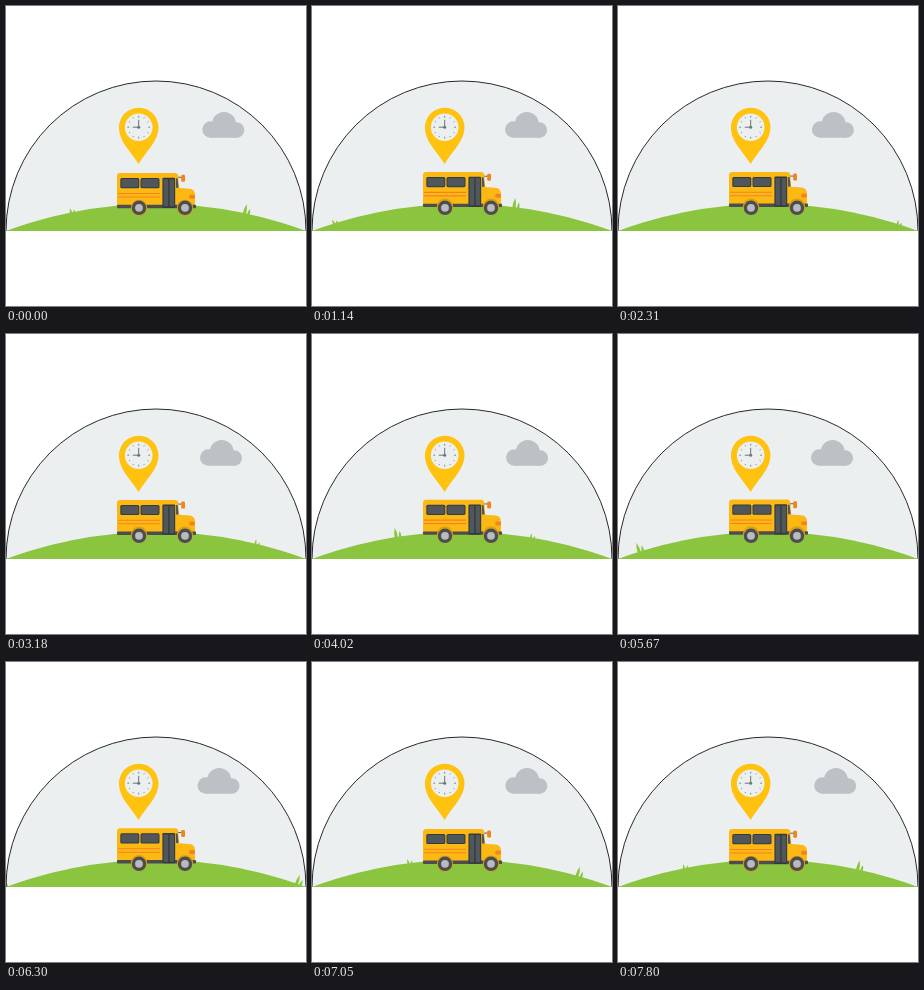
An HTML page with a canvas for the animation above (7.83 s loop, 300x300 px).

```html
<!DOCTYPE html>
<html lang="en">
<head>
<meta charset="utf-8">
<title>School bus</title>
<style>
html, body { margin: 0; width: 100%; height: 100%; overflow: hidden; background: #fff; }
canvas { display: block; width: 300px; height: 300px; }
</style>
</head>
<body>
<canvas id="stage" width="300" height="300"></canvas>
<script>
const canvas = document.getElementById('stage');
const ctx = canvas.getContext('2d');
const ratio = window.devicePixelRatio || 1;
canvas.width = canvas.height = 300 * ratio;

const LOOP = 7830, STEP = 30, TAU = Math.PI * 2;
const HILL = { x: 150, y: 628, r: 430 };
const C = {
  sky: '#ebeff0', grass: '#8bc53f', cloud: '#bcc1c5', pin: '#ffc20e',
  bus: '#fdb913', dark: '#4d4d4f', glass: '#50575b', frame: '#343b40',
  orange: '#f58220', hub: '#b9bcbe', ink: '#6d7478'
};

// [time, value] points; the grass runs on past the end of the loop
const cloudPath = [[0, 0], [1140, -3.2], [2310, -2.4], [4020, -2.2], [5070, -1.4], [6300, -4.8], [7830, 0]];
const tallPath = [[5900, .365], [6300, .333], [7830, .2074], [8970, .1212], [11850, -.154], [12900, -.249], [14200, -.37]];
const shortPath = [[1800, .352], [2310, .306], [4020, .161], [7830, -.199], [8970, -.3028], [9650, -.365]];

// Smooth curve through the points, null outside them
function follow(path, t) {
  const last = path.length - 1;
  if (t < path[0][0] || t > path[last][0]) return null;
  let i = 0;
  while (i < last - 1 && t > path[i + 1][0]) i++;
  const slope = k => {
    const a = path[Math.max(k - 1, 0)], b = path[Math.min(k + 1, last)];
    return (b[1] - a[1]) / (b[0] - a[0]);
  };
  const [t0, v0] = path[i], [t1, v1] = path[i + 1];
  const d = t1 - t0, u = (t - t0) / d, w = 1 - u;
  return v0 * w * w * (1 + 2 * u) + v1 * u * u * (3 - 2 * u) +
    d * u * w * (w * slope(i) - u * slope(i + 1));
}

function disc(x, y, r, color) {
  ctx.fillStyle = color;
  ctx.beginPath();
  ctx.arc(x, y, r, 0, TAU);
  ctx.fill();
}

function box(x, y, w, h, r, color) {
  ctx.fillStyle = color;
  ctx.beginPath();
  ctx.roundRect(x, y, w, h, r);
  ctx.fill();
}

function line(x1, y1, x2, y2, width, color) {
  ctx.strokeStyle = color;
  ctx.lineWidth = width;
  ctx.beginPath();
  ctx.moveTo(x1, y1);
  ctx.lineTo(x2, y2);
  ctx.stroke();
}

function dome() {
  ctx.beginPath();
  ctx.arc(150, 225, 150, Math.PI, TAU);
}

function drawCloud(dx) {
  ctx.save();
  ctx.translate(dx, 0);
  disc(204.5, 123.5, 8.2, C.cloud);
  disc(218, 118, 12, C.cloud);
  disc(230.5, 124, 7.8, C.cloud);
  box(204, 119, 27, 12.7, 0, C.cloud);
  ctx.restore();
}

function blade(x, w, h, lean) {
  ctx.beginPath();
  ctx.moveTo(x - w / 2, 2);
  ctx.quadraticCurveTo(x - w / 2, -h / 2, x + lean, -h);
  ctx.quadraticCurveTo(x + w / 2 + .4, -h / 2, x + w / 2, 2);
  ctx.fill();
}

function drawTuft(path, t, blades) {
  for (const time of [t, t + LOOP]) {
    const angle = follow(path, time);
    if (angle === null) continue;
    ctx.save();
    ctx.translate(HILL.x, HILL.y);
    ctx.rotate(angle);
    ctx.translate(0, -HILL.r);
    ctx.fillStyle = C.grass;
    for (const b of blades) blade(...b);
    ctx.restore();
  }
}

function drawPin() {
  ctx.fillStyle = C.pin;
  ctx.beginPath();
  ctx.arc(132.7, 121.5, 19.8, Math.PI * .93, Math.PI * .07);
  ctx.bezierCurveTo(150, 137, 139, 147, 132.7, 158);
  ctx.bezierCurveTo(126, 147, 115, 137, 113.4, 125.9);
  ctx.fill();
  disc(132.7, 121.2, 13.8, C.sky);
  for (let i = 0; i < 12; i++) {
    const a = i * TAU / 12, c = Math.cos(a), s = Math.sin(a);
    const inner = i % 3 ? 10.3 : 9.6;
    line(132.7 + inner * c, 121.2 + inner * s, 132.7 + 11.3 * c, 121.2 + 11.3 * s, .9, C.ink);
  }
  line(132.7, 121.2, 132.7, 113.8, 1, C.ink);
  line(132.7, 121.2, 126.8, 121.2, 1, C.ink);
  disc(132.7, 121.2, 1.5, C.ink);
}

function drawWheel(x) {
  disc(x, 201.8, 7.2, C.dark);
  disc(x, 201.8, 3.9, C.hub);
}

function drawBody(dy) {
  ctx.save();
  ctx.translate(0, dy);

  // mirror
  line(171, 170.5, 177, 170.5, .9, C.dark);
  box(175.2, 168, 3.8, 7, 1.2, C.orange);

  ctx.fillStyle = C.bus;
  ctx.beginPath();
  ctx.moveTo(111, 201);
  ctx.lineTo(111, 169.5);
  ctx.quadraticCurveTo(111, 166.3, 114, 166.3);
  ctx.lineTo(169.5, 166.3);
  ctx.quadraticCurveTo(172, 166.3, 172.2, 168.8);
  ctx.lineTo(173.2, 181.2);
  ctx.lineTo(183.5, 182);
  ctx.quadraticCurveTo(188.8, 182.6, 189, 188);
  ctx.lineTo(189, 201);
  ctx.fill();

  // windscreen edge
  ctx.fillStyle = C.glass;
  ctx.beginPath();
  ctx.moveTo(170, 171.5);
  ctx.lineTo(171.6, 171.5);
  ctx.lineTo(172.6, 181);
  ctx.lineTo(170, 181);
  ctx.fill();

  for (const x of [114.3, 134.5]) {
    box(x, 171.3, 19, 10.2, 1.6, C.frame);
    box(x + 1, 172.3, 17, 8.2, 1, C.glass);
  }
  line(112, 186.7, 154, 186.7, 1.1, C.orange);
  line(112, 190.2, 154, 190.2, 1.1, C.orange);

  box(111, 198, 79, 3.4, .8, C.dark);

  // door
  box(156.4, 171, 12.8, 30.2, 1.2, C.frame);
  box(157.6, 172.4, 4.6, 27.2, .5, C.glass);
  box(163.6, 172.4, 4.6, 27.2, .5, C.glass);

  box(183.2, 188, 5.8, 4, 1.6, C.orange);

  // wheel arches
  for (const x of [133, 179]) disc(x, 201, 8.1, '#dba014');
  ctx.restore();
}

function draw(t) {
  ctx.setTransform(ratio, 0, 0, ratio, 0, 0);
  ctx.fillStyle = '#fff';
  ctx.fillRect(0, 0, 300, 300);

  ctx.save();
  dome();
  ctx.clip();
  ctx.fillStyle = C.sky;
  ctx.fillRect(0, 0, 300, 225);
  drawCloud(follow(cloudPath, t));
  drawTuft(tallPath, t, [[0, 3.4, 9.5, .2], [4, 2.6, 5.5, .5]]);
  drawTuft(shortPath, t, [[0, 2, 4.4, -.4], [3.2, 1.8, 2.4, .3]]);
  disc(HILL.x, HILL.y, HILL.r, C.grass);
  ctx.restore();

  ctx.strokeStyle = '#111';
  ctx.lineWidth = .9;
  dome();
  ctx.stroke();

  drawPin();
  drawBody(.75 * Math.cos(TAU * 9 * t / LOOP));
  drawWheel(133);
  drawWheel(179);
}

const start = performance.now();
function tick() {
  const t = (performance.now() - start) % LOOP;
  draw(Math.floor(t / STEP) * STEP);
  requestAnimationFrame(tick);
}
tick();
</script>
</body>
</html>
```
